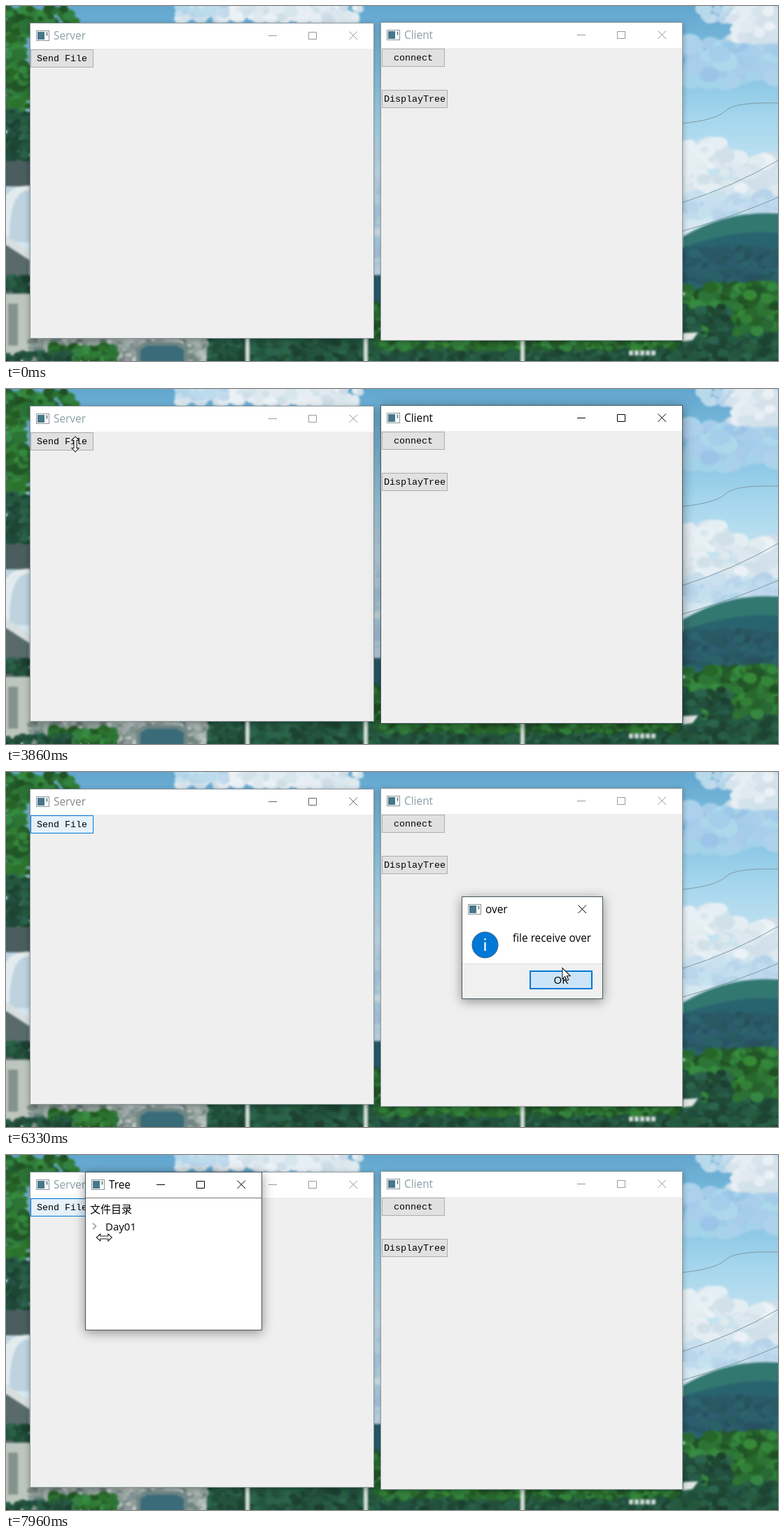
These frames come from a looping animation (1103 by 508 pixels, 8000 ms). An HTML page with a canvas:

```html
<!DOCTYPE html>
<html lang="en">
<head>
<meta charset="utf-8">
<title>Server and client</title>
<style>
html, body { margin: 0; width: 100%; height: 100%; overflow: hidden; }
#stage { position: absolute; left: 0; top: 0; width: 1103px; height: 508px; overflow: hidden; }
#stage * { box-sizing: border-box; position: absolute; }
canvas, .cursor { left: 0; top: 0; }
.win { background: #efefef; border: 1px solid #8f9a9e; box-shadow: 0 2px 8px rgba(0,0,0,.3); color: #8b9ea5; --ink: #999;
  font: 15.4px/20px "Open Sans", "Noto Sans", "Noto Sans CJK SC", "Noto Sans CJK", sans-serif; white-space: pre; }
.win.dim { color: #888; --ink: #666; }
.win.active { border-color: #48585f; box-shadow: 0 3px 15px rgba(0,0,0,.42); color: #000; --ink: #000; }
.bar { left: 0; right: 0; top: 0; height: 36px; background: #fff; }
.bar svg { top: 0; }
.icon { left: 8px; }
.tools { right: 0; }
.tools path { fill: none; stroke: var(--ink); }
.title { left: 33px; top: 8px; }
.btn { height: 26px; border: 1px solid #adadad; background: #e1e1e1; color: #000; text-align: center;
  font: 13.33px/26px "Liberation Mono", monospace; }
.btn.tint { background: #dbe3e8; border-color: #7d97a8; }
.btn.hover { background: #e5f1fb; border-color: #0078d7; }
.btn.press { background: #cce4f7; border-color: #005499; }
#dialog, #tree { background: #fff; }
#dialog .foot { left: 0; right: 0; top: 95px; bottom: 0; background: #f0f0f0; border-top: 1px solid #dfdfdf; }
#dialog .info { left: 13px; top: 49px; }
#dialog .msg { left: 72px; top: 49px; }
#dialog .btn { height: 27px; border: 2px solid #0078d7; font: 15px/23px "Open Sans", "Noto Sans", sans-serif; }
#tree .line { left: 0; right: 0; top: 36px; height: 1px; background: #777; }
#tree .head { left: 6px; top: 42px; font-size: 15px; }
#tree .day { left: 28px; top: 67px; font-size: 15px; }
#tree .chev { left: 8px; top: 71px; }
</style>
</head>
<body>
<div id="stage">
  <canvas id="scene" width="1103" height="508"></canvas>
  <div class="win" id="server"></div>
  <div class="win" id="client"></div>
  <div class="win active" id="dialog">
    <div class="foot"></div>
    <svg class="info" width="40" height="40"><circle cx="19.5" cy="19.5" r="18.5" fill="#0078d7" stroke="#2b5c86"/><path d="M19.5 15.5V28M19.5 10V12.5" stroke="#fff" stroke-width="2.2"/></svg>
    <div class="msg">file receive over</div>
  </div>
  <div class="win active" id="tree">
    <div class="line"></div>
    <div class="head">文件目录</div>
    <svg class="chev" width="10" height="12"><path d="M2 1.5L6.5 6L2 10.5" fill="none" stroke="#999" stroke-width="1.7"/></svg>
    <div class="day">Day01</div>
  </div>
  <svg class="cursor" width="1103" height="508"><path id="pointer" fill="#fff" stroke="#222" stroke-width="1.1"/></svg>
</div>
<script>
const $ = id => document.getElementById(id);
const LOOP = 8000;
const STEP = 76;

// ---- scenery ----
const canvas = $('scene');
const ctx = canvas.getContext('2d');
let seed = 7;
const rnd = () => (seed = (seed * 16807) % 2147483647) / 2147483647;

function rect(color, x, y, w, h) {
  ctx.fillStyle = color;
  ctx.fillRect(x, y, w, h);
}
function shape(color, path) {
  ctx.fillStyle = color;
  ctx.fill(new Path2D(path));
}
function wire(path) {
  ctx.strokeStyle = '#8199a3';
  ctx.stroke(new Path2D(path));
}
// Fill an area with small soft clumps; each clump gets its colour from pick().
function scatter(x, y, w, h, size, pick) {
  const n = w * h / (size * size) * 1.6;
  for (let i = 0; i < n; i++) {
    const r = size * (.4 + rnd() * .7);
    ctx.fillStyle = pick();
    ctx.beginPath();
    ctx.ellipse(x + rnd() * w, y + rnd() * h, r * 1.3, r, 0, 0, 7);
    ctx.fill();
  }
}
const tone = (hue, sat, light, spread) => () => `hsl(${hue + rnd() * 12},${sat}%,${light + (rnd() - .5) * spread}%)`;
const leaf = tone(120, 44, 30, 17);
const shade = tone(148, 40, 23, 11);
const cloud = tone(196, 36, 90, 9);
const haze = tone(198, 55, 83, 7);
const hill = tone(186, 42, 28, 5);
const stone = tone(160, 7, 60, 36);

function paint() {
  const sky = ctx.createLinearGradient(0, 0, 0, 320);
  ['#62a5ce', '#80c0e0', '#a5d6ed', '#c5e3f0', '#d6e8f0'].forEach((c, i) => sky.addColorStop(i / 4, c));
  rect(sky, 0, 0, 1103, 508);

  scatter(250, 0, 255, 20, 8, cloud);
  scatter(245, 0, 70, 12, 6, haze);
  scatter(975, 50, 128, 60, 14, tone(198, 62, 78, 5));
  scatter(995, 0, 108, 20, 9, haze);
  scatter(1035, 0, 68, 46, 10, cloud);
  scatter(967, 195, 60, 75, 11, cloud);
  scatter(1020, 215, 83, 50, 11, cloud);
  scatter(967, 270, 136, 30, 10, haze);
  scatter(526, 195, 9, 190, 9, haze);

  shape('#337771', 'M967 330Q1030 292 1103 297V410H967Z');
  shape('#28646f', 'M967 345Q1050 318 1103 325V410H967Z');
  scatter(967, 348, 136, 45, 7, hill);
  rect('#285f6d', 524, 385, 14, 45);

  scatter(967, 402, 136, 80, 9, leaf);
  scatter(967, 430, 136, 55, 7, shade);
  scatter(1045, 398, 58, 70, 8, leaf);
  scatter(524, 425, 14, 60, 6, leaf);
  rect('#215a40', 285, 474, 818, 34);
  scatter(285, 478, 818, 30, 6, shade);
  scatter(530, 476, 430, 14, 6, leaf);
  shape('#e2e7e4', 'M967 468L989 467L981 478L967 480Z');
  for (let i = 0; i < 5; i++) rect('#d2ddda', 890 + 8 * i, 493, 6, 7);
  for (const x of [342, 511, 735]) rect('#d3dcd8', x, 474, 6, 34);

  scatter(0, 4, 98, 20, 7, leaf);
  scatter(0, 10, 32, 210, 8, leaf);
  scatter(0, 150, 32, 72, 6, shade);

  rect('#4b5d5f', 0, 222, 36, 36);
  rect('#bdd3e0', 0, 258, 36, 80);
  shape('#e3ebed', 'M0 272Q8 257 34 257V264Q6 262 5 330H0Z');
  shape('#d8dfde', 'M0 328L34 352V366L0 344Z');
  shape('#596a6a', 'M0 342L34 364V412H0Z');
  scatter(0, 388, 34, 20, 6, shade);
  rect('#bcc5be', 0, 412, 36, 96);
  rect('#84938c', 3, 426, 14, 60);

  rect('#a4afa7', 34, 474, 253, 34);
  scatter(34, 478, 250, 30, 5, stone);
  scatter(64, 486, 92, 22, 6, leaf);
  scatter(0, 496, 90, 12, 5, shade);
  shape('#6f8786', 'M186 508V488L198 481H248L260 488V508Z');
  shape('#3a6b78', 'M192 508V492L202 486H244L254 492V508Z');

  ctx.filter = 'blur(1.4px)';
  ctx.drawImage(canvas, 0, 0);
  ctx.filter = 'none';
  wire('M967 168Q1015 163 1028 150T1103 139');
  wire('M967 281Q1040 258 1103 221M967 322Q1040 301 1103 274');
}

// ---- windows ----
const icon = '<svg class="icon" width="20" height="36"><rect x=".5" y="10.5" width="18" height="14" fill="#fbfcfc" stroke="#8b9599"/>' +
  '<rect x="2" y="12" width="10" height="11" fill="#46778a"/><path d="M15.5 12.5v5" stroke="#57707a" stroke-width="1.5"/></svg>';
const closeMark = 'M125.5 11.5l11.5 11.5M137 11.5l-11.5 11.5';
const allMarks = 'M10 17.5h12M67.5 12.5h11v10h-11z' + closeMark;

const place = (el, x, y, w) => { el.style.cssText += `;left:${x}px;top:${y}px;width:${w}px`; };

function frame(id, name, x, y, w, h, marks = allMarks) {
  const el = $(id);
  place(el, x, y, w);
  el.style.height = h + 'px';
  el.insertAdjacentHTML('afterbegin', `<div class="bar">${icon}<div class="title">${name}</div>` +
    `<svg class="tools" width="160" height="36"><path d="${marks}"/></svg></div>`);
  return el;
}
function button(win, label, x, y, w) {
  const el = document.createElement('div');
  el.textContent = label;
  place(el, x, y, w);
  win.append(el);
  return el;
}

const server = frame('server', 'Server', 34, 24, 492, 452);
const client = frame('client', 'Client', 535, 23, 432, 456);
const dialog = frame('dialog', 'over', 651, 178, 202, 147, closeMark);
const tree = frame('tree', 'Tree', 113, 24, 253, 227);
const send = button(server, 'Send File', 0, 37, 90);
const connect = button(client, 'connect', 1, 37, 90);
const show = button(client, 'DisplayTree', 1, 96, 94);
const ok = button(dialog, 'OK', 96, 105, 90);

// ---- timeline ----
const clicks = { connect: 2370, send: 4180, ok: 6330, show: 7090 };
const opens = { dialog: 4325, tree: 7170 };

// Pointer stops: leaves at `from`, rests at (x, y) by `to`.
const stops = [
  { from: 220, to: 970, x: 608, y: 64 },
  { from: 1050, to: 1200, x: 610, y: 75, form: 'tall' },
  { from: 2930, to: 3080, x: 327, y: 67 },
  { from: 3250, to: 3400, x: 104, y: 92 },
  { from: 3630, to: 3860, x: 99, y: 79, form: 'tall' },
  { from: 4780, to: 5160, x: 812, y: 343 },
  { from: 5240, to: 5550, x: 795, y: 280 },
  { from: 6570, to: 6950, x: 597, y: 133 },
  { from: 7330, to: 7960, x: 139, y: 118, form: 'wide' }
];
const forms = {
  arrow: 'M0 .5V16L3.8 12.6L6.3 18.5L8.8 17.5L6.3 11.8H11.2Z',
  tall: 'M0-11L5-5.5H2V5.5H5L0 11L-5 5.5H-2V-5.5H-5Z',
  wide: 'M-11 0L-5.5-5V-2H5.5V-5L11 0L5.5 5V2H-5.5V5Z'
};

const clamp = v => Math.max(0, Math.min(1, v));
const within = (t, a, b) => t >= a && t < b;

function pointerAt(t) {
  let x = 966, y = 530, form = 'arrow';
  for (const s of stops) {
    if (t < s.from) break;
    const k = clamp((Math.floor((t - s.from) / STEP + .1) + 1) * STEP / (s.to - s.from + STEP));
    const e = k * k * (3 - 2 * k);
    x += (s.x - x) * e;
    y += (s.y - y) * e;
    form = t >= s.to && s.form || 'arrow';
  }
  return { x, y, form };
}

// Windows fade and grow over three steps.
const ramp = (t, start, lead) => t < start ? 0 : clamp((Math.floor((t - start) / 80) + lead) / 3);
function fade(el, p) {
  el.style.opacity = p;
  el.style.transform = p < 1 ? `scale(${.947 + .053 * p})` : 'none';
}
function focus(el, active, dim) {
  el.className = 'win' + (active ? ' active' : dim ? ' dim' : '');
}
const look = (el, name) => { el.className = 'btn ' + name; };

function draw(t) {
  const treeReady = opens.tree + 160;
  focus(server, within(t, clicks.send, opens.dialog), within(t, opens.dialog, treeReady));
  focus(client, within(t, clicks.connect, clicks.send) || within(t, clicks.ok + 80, opens.tree), within(t, opens.tree, treeReady));

  look(connect, within(t, clicks.connect, clicks.connect + 220) ? 'tint' : '');
  look(send, t < clicks.send ? '' : t < clicks.send + 70 ? 'press' : 'hover');
  look(ok, t < 5470 ? '' : within(t, clicks.ok, clicks.ok + 80) ? 'press' : 'hover');
  look(show, within(t, clicks.show - 70, clicks.show + 160) ? 'tint' : '');

  fade(dialog, ramp(t, opens.dialog, 1) - ramp(t, clicks.ok, 0));
  fade(tree, ramp(t, opens.tree, .5));

  const { x, y, form } = pointerAt(t);
  $('pointer').setAttribute('d', forms[form]);
  $('pointer').setAttribute('transform', `translate(${x.toFixed(1)} ${y.toFixed(1)})`);
}

paint();
const start = performance.now();
function tick() {
  draw((performance.now() - start) % LOOP);
  requestAnimationFrame(tick);
}
tick();
</script>
</body>
</html>
```
